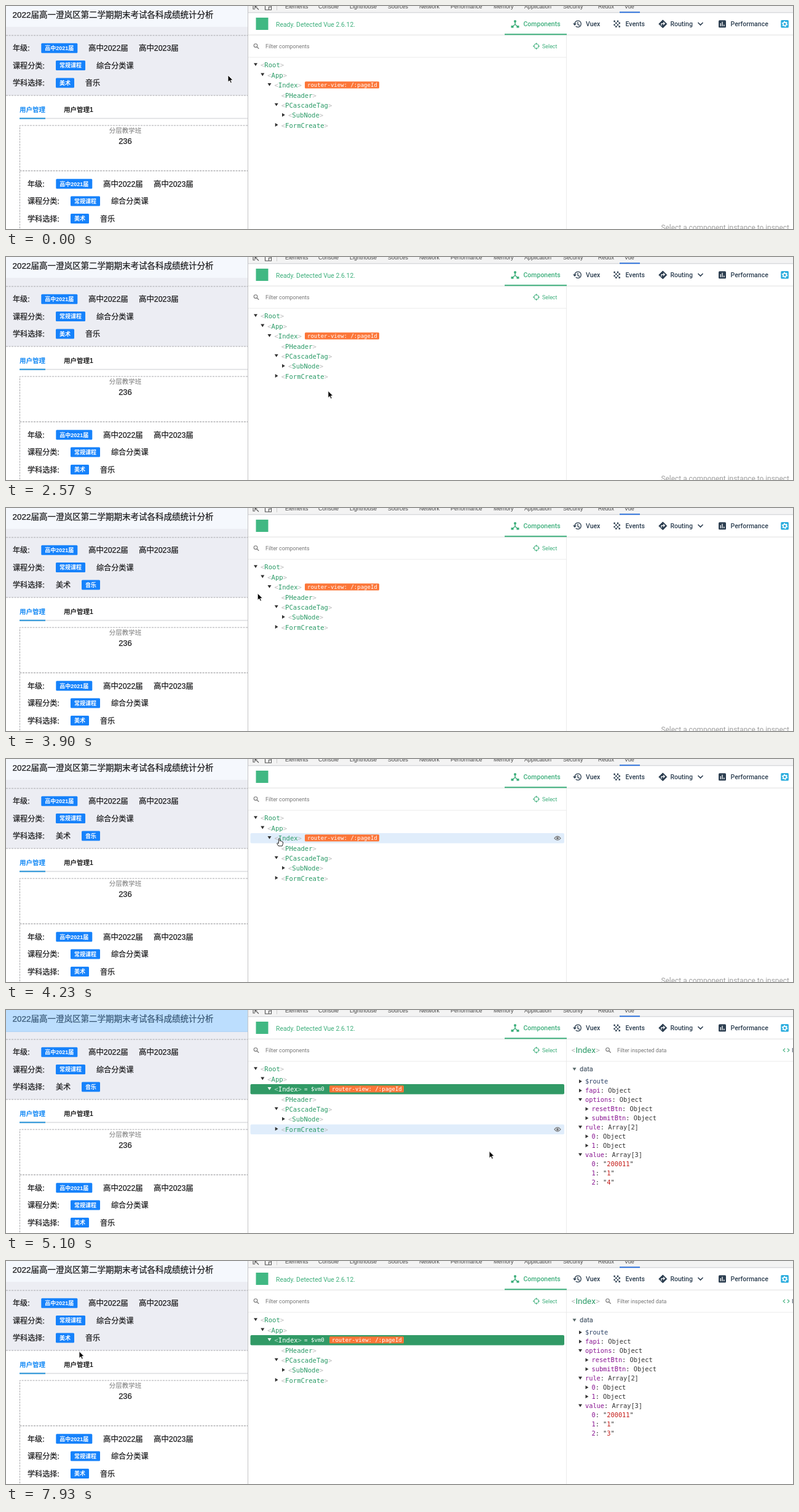
An HTML page that plays this animation: 1280x364 px, repeating every 8000 ms.

```html
<!DOCTYPE html>
<html lang="zh-CN">
<head>
<meta charset="utf-8">
<title>Component inspector</title>
<style>
html, body { margin: 0; width: 100%; height: 100%; overflow: hidden; background: #fff; }
svg {
  display: block; width: 1280px; height: 364px;
  --green: #3eaf7c; --name: #2a9a66; --orange: #fc7638; --blue: #2badde; --logo: #41b883;
  --ink: #2c3e50; --dark: #333; --muted: #777;
}
svg.off {
  --green: #adadad; --name: #a0a0a0; --orange: #b3b3b3; --blue: #c0c0c0; --logo: #adadad;
  --ink: #666; --dark: #707070; --muted: #a8a8a8;
}
.cn { font-family: "Liberation Sans", "Noto Sans CJK SC", "Noto Sans CJK", sans-serif; }
.ui { font-family: Roboto, sans-serif; }
.mono { font-family: "DejaVu Sans Mono", monospace; }
.firm { stroke: #1c1c1e; stroke-width: .25; }
.dash { stroke: #a8a8ac; stroke-dasharray: 3 1.5; fill: none; }
</style>
</head>
<body>
<svg id="stage" viewBox="0 0 1280 364"></svg>
<script>
const BLUE = '#1682fb', INK = 'var(--ink)', DARK = 'var(--dark)', MUTED = 'var(--muted)', LOOP = 8000;
const stage = document.getElementById('stage');

const text = (cls, x, y, size, fill, s, more = '') =>
  `<text class="${cls}" x="${x}" y="${y}" font-size="${size}" fill="${fill}" ${more}>${s}</text>`;
const rect = (x, y, w, h, fill, r = 0) =>
  `<rect x="${x}" y="${y}" width="${w}" height="${h}" rx="${r}" fill="${fill}"/>`;
const path = (d, stroke, width = 1, fill = 'none') =>
  `<path d="${d}" stroke="${stroke}" stroke-width="${width}" fill="${fill}"/>`;
const dot = (x, y, r, fill) => `<circle cx="${x}" cy="${y}" r="${r}" fill="${fill}"/>`;
const ring = (x, y, r, stroke, w = 1) =>
  `<circle cx="${x}" cy="${y}" r="${r}" fill="none" stroke="${stroke}" stroke-width="${w}"/>`;
const group = (id, s) => `<g id="${id}">${s}</g>`;

// Left page
const label = (x, y, s, size = 12.1) => text('cn firm', x, y + 4.4, size, '#1c1c1e', s);
const chip = (x, y, w, s) => rect(x, y - 8, w, 16, BLUE, 1.5) +
  text('cn', x + w / 2, y + 3.3, 9, '#fff', s, 'text-anchor="middle" font-weight="700"');

function filters(dx, dy, choice) {
  return `<g transform="translate(${dx} ${dy})">` +
    label(11, 69, '年级:') + chip(57.3, 68.7, 59, '高中2021届') +
    label(134, 69, '高中2022届', 12.4) + label(216, 69, '高中2023届', 12.4) +
    label(11, 97.3, '课程分类:') + chip(81, 97, 48, '常规课程') + label(147, 97.3, '综合分类课') +
    label(11, 125.6, '学科选择:') + choice + '</g>';
}
const artOn = chip(81, 125.4, 30, '美术') + label(129, 125.6, '音乐');
const musicOn = label(81, 125.6, '美术') + chip(123, 125.4, 30, '音乐');

const page = () =>
  rect(0, 0, 393, 364, '#fff') + rect(0, 0, 393, 146, '#ecedf3') + rect(0, 0, 393, 34, '#f5f8fd') +
  text('cn firm', 10.5, 19, 13.5, '#1c1c1e', '2022届高一澄岚区第二学期期末考试各科成绩统计分析') +
  '<path class="dash" d="M0 48H393M0 146H393"/>' +
  filters(0, 0, group('art', artOn) + group('music', musicOn)) +
  text('cn', 22, 173, 10.5, '#1389f5', '用户管理', 'font-weight="700"') +
  text('cn', 94, 173, 10.5, '#222', '用户管理1', 'font-weight="700"') +
  rect(22, 182.7, 371, 1.6, '#dcdde0') + rect(22, 182.5, 42, 2, '#1e8fd8') +
  '<path class="dash" d="M393 195H22.5V364"/>' +
  '<path class="dash" style="stroke:#8c8c90" d="M22.5 269H393"/>' +
  text('cn', 194, 207.3, 10.5, '#777', '分层教学班', 'text-anchor="middle"') +
  text('cn firm', 194, 224.6, 13, '#1c1c1e', '236', 'text-anchor="middle"') +
  filters(24, 221.5, artOn) +
  group('overlayAll', rect(0, 0, 393, 364, 'rgba(104,182,255,.4)')) +
  group('overlayHead', rect(0, 0, 393, 36, 'rgba(104,182,255,.4)'));

// Developer tools chrome
const panels = {
  Elements: 454, Console: 508, Lighthouse: 559, Sources: 621, Network: 672, Performance: 723,
  Memory: 793, Application: 843, Security: 906, Redux: 963, Vue: 1006
};
const tab = (x, s, fill = INK) => text('ui', x, 33, 10.5, fill, s, 'font-weight="500"');
const lens = (x, y) => ring(x, y, 2.8, MUTED, 1.1) + path(`M${x + 2} ${y + 2}l3.2 3.2`, MUTED, 1.3);

const topBar = () =>
  rect(394, 0, 886, 10.5, '#f3f3f3') + path('M394 10.8H1280', '#c9ccd0') +
  path('M402 0V5H405M405 0L411 6M405 0V4M405 0H409', '#555', 1.1) +
  path('M421.5 0V6.2H431.5V0M427.5 6V1.5H431', '#555', 1.1) + path('M440.5 0V7', '#ccc') +
  Object.entries(panels).map(([s, x]) => text('cn', x, 4, 9, '#444', s)).join('') +
  rect(998, 9.3, 33, 1.9, '#2a6fdb');

const header = () =>
  rect(406.5, 19, 20, 20, 'var(--logo)') +
  group('ready', text('ui', 439, 33.5, 10.4, 'var(--green)', 'Ready. Detected Vue 2.6.12.')) +
  path('M828 25V30L823.5 34M828 30L832.5 34', 'var(--green)', 1.5) +
  dot(828, 25, 2.1, 'var(--green)') + rect(821.5, 32, 4, 3.6, 'var(--green)') +
  rect(830.5, 32, 4, 3.6, 'var(--green)') + tab(841.5, 'Components', 'var(--green)') +
  path('M925 29.5a5.2 5.2 0 1 1 1.7 3.6M930 26V30L933 31.6', INK, 1.3) +
  path('M922 28.5H928L925 32Z', 'none', 0, INK) + tab(943, 'Vuex') +
  [0, 1, 2, 3].map(r => [0, 1].map(c =>
    dot(989.6 + c * 5.4 + (r % 2) * 2.7, 25 + r * 2.9, 1.4, INK)).join('')).join('') +
  tab(1007.5, 'Events') +
  path('M1068.3 22.8L1074.8 29.3L1068.3 35.8L1061.8 29.3Z', INK, 1, INK) +
  path('M1066 32V28.6H1070.5M1069 26.5L1071.2 28.6L1069 30.8', '#fff', 1.2) +
  tab(1080.5, 'Routing') + path('M1125.5 27L1129.5 31L1133.5 27', INK, 1.6) +
  rect(1159, 23.2, 12, 12, INK, 1.5) +
  path('M1162.2 28V33M1165 25.8V33M1167.8 30.5V33', '#fff', 1.3) + tab(1178.5, 'Performance') +
  rect(1260.3, 23, 12.6, 12.6, 'var(--blue)', 1.5) +
  ring(1266.6, 29.3, 2.7, '#fff', 1.6) +
  '<circle cx="1266.6" cy="29.3" r="4" fill="none" stroke="#fff" stroke-width="1.3" stroke-dasharray="2.1 2.09"/>' +
  path('M394 47.3H1280', '#e2e2e2') + rect(811, 45.3, 101, 2, 'var(--green)');

const search = () =>
  lens(406, 64.6) + text('ui', 422, 69, 8.9, MUTED, 'Filter components') +
  ring(862.5, 65.5, 3.9, 'var(--green)') +
  path('M862.5 60V63M862.5 68V71M857 65.5H860M865 65.5H868', 'var(--green)') +
  text('ui', 872, 69, 8.9, 'var(--green)', 'Select') +
  path('M394 83.8H911M911.5 48V364', '#ebebeb');

// Component tree: name, depth, arrow (1 open, 0 closed, -1 none)
const nodes = [['Root', 0, 1], ['App', 1, 1], ['Index', 2, 1], ['PHeader', 3, -1],
  ['PCascadeTag', 3, 1], ['SubNode', 4, 0], ['FormCreate', 3, 0]];
const ROW = 16.4, TOP = 88.3;
const arrow = (x, y, open, fill = DARK) => open < 0 ? '' : path(open
  ? `M${x - 3} ${y - 2.5}H${x + 3}L${x} ${y + 2.3}Z`
  : `M${x - 2} ${y - 3}V${y + 3}L${x + 2.8} ${y}Z`, 'none', 0, fill);
const rowBar = (y, fill) => rect(397.5, y, 510.5, 16.4, fill, 2);
const routeTag = x => rect(x, 123.2, 121, 11.3, 'var(--orange)', 1.5) +
  text('mono', x + 4, 132, 9, '#fff', 'router-view: /:pageId');

function node([name, depth, open], i, chosen) {
  const y = TOP + ROW * (i + .5), x = 414 + depth * 11.25;
  const edge = chosen ? '#a9d9c1' : '#bbb';
  return arrow(x - 8, y - .8, open, chosen ? '#fff' : DARK) +
    text('mono', x, y + 3.8, 10.55, chosen ? '#fff' : 'var(--name)',
      `<tspan fill="${edge}">&lt;</tspan>${name}<tspan fill="${edge}">&gt;</tspan>`);
}
const tree = () =>
  group('hover', rowBar(0, '#e0edfb') +
    path('M892 8.2Q897 1.8 902 8.2Q897 14.6 892 8.2Z', '#777', 1.2) + dot(897, 8.2, 2, '#777')) +
  nodes.map((n, i) => i === 2 ? '' : node(n, i)).join('') +
  group('plain', node(nodes[2], 2) + routeTag(486)) +
  group('chosen', rowBar(121, '#319a66') + node(nodes[2], 2, true) +
    text('mono', 485, 132.4, 9.1, '#fff', '= $vm0') + routeTag(526));

// Data pane: key, value, depth, arrow
const fields = [['$route', '', 0, 0], ['fapi', 'Object', 0, 0], ['options', 'Object', 0, 1],
  ['resetBtn', 'Object', 1, 0], ['submitBtn', 'Object', 1, 0], ['rule', 'Array[2]', 0, 1],
  ['0', 'Object', 1, 0], ['1', 'Object', 1, 0], ['value', 'Array[3]', 0, 1],
  ['0', '"200011"', 1, -1], ['1', '"1"', 1, -1], ['2', '"4"', 1, -1]];

function field([key, value, depth, open], i) {
  const y = 116.6 + i * 14.95, x = 942 + depth * 10.5;
  const quoted = value[0] === '"';
  const shown = quoted
    ? `"<tspan fill="#c41a16" ${i === 11 ? 'id="last"' : ''}>${value.slice(1, -1)}</tspan>"` : value;
  return arrow(x - 8, y, open) + text('mono', x, y + 3.7, 10.3, '#333',
    `<tspan fill="${value ? '#881391' : '#2f4568'}">${key}</tspan>` + (value && ': ' + shown));
}
const dataPane = () =>
  text('ui', 919.5, 70, 13.5, 'var(--name)',
    '<tspan fill="#bbb">&lt;</tspan>Index<tspan fill="#bbb">&gt;</tspan>') +
  lens(978.5, 64.6) + text('ui', 994, 69, 8.9, MUTED, 'Filter inspected data') +
  path('M1267 62.8L1264.2 65.6L1267 68.4M1271 62.8L1273.8 65.6L1271 68.4', 'var(--green)', 1.2) +
  text('ui', 1278, 69, 8.9, INK, 'Inspect DOM') + path('M912 83.8H1280', '#ebebeb') +
  arrow(924.5, 96.8, 1, '#566') + text('ui', 933, 100.4, 11, INK, 'data') +
  fields.map(field).join('');

const pointer =
  group('arrow', path('M0 0V11.2L2.6 8.8L4.4 12.8L6.3 12L4.6 8.1H8.1Z', '#fff', .9, '#000')) +
  group('hand', path('M-1 0Q0-1.5 1 0V4Q2 3.2 3 4.4Q4 3.8 4.7 5Q6 4.6 6 6V8.5L4.8 12H-1.2L-3.8 7.8Q-3.5 6.3-1 7.8Z',
    '#222', 1, '#fff'));

stage.innerHTML = rect(394, 0, 886, 364, '#fff') + page() + path('M393.5 0V364', '#c4c4c6') +
  topBar() + header() + search() + tree() +
  group('empty', text('ui', 1065.5, 366, 11.9, '#a0a0a0', 'Select a component instance to inspect')) +
  group('data', dataPane()) + group('pointer', pointer);

const el = {};
stage.querySelectorAll('[id]').forEach(n => el[n.id] = n);
const show = (id, on) => el[id].setAttribute('display', on ? 'inline' : 'none');

// Pointer stops: time, x, y
const stops = [[0, 361, 113], [1300, 361, 113], [1470, 449, 132], [1760, 560, 236], [2400, 560, 236],
  [3000, 377, 148], [3750, 377, 148], [4060, 444, 130], [4700, 446, 130], [5100, 786, 230.5],
  [5300, 786, 230.5], [6100, 817, 264.5], [6500, 817, 264.5], [7250, 96, 127], [7400, 96, 127],
  [7650, 119, 147.5], [LOOP, 119, 147.5]];

function pointerAt(t) {
  const i = Math.max(1, stops.findIndex(s => s[0] > t));
  const [t0, x0, y0] = stops[i - 1], [t1, x1, y1] = stops[i];
  const u = (t - t0) / (t1 - t0), k = u * u * (3 - 2 * u);
  return [x0 + (x1 - x0) * k, y0 + (y1 - y0) * k];
}
function rowAt([x, y]) {
  const i = Math.floor((y - TOP) / ROW);
  return x > 398 && x < 908 && nodes[i] ? i : -1;
}

function draw(t) {
  const within = (a, b) => t >= a && t < b;
  const at = pointerAt(t), picked = t >= 4480;
  // The row highlight trails the pointer slightly.
  const row = t > 4000 ? rowAt(pointerAt(t - 150)) : -1;
  const music = within(3900, 7320);

  stage.classList.toggle('off', within(3640, 3900));
  show('ready', !within(3900, 4400));
  show('art', !music);
  show('music', music);
  show('overlayAll', within(4320, 4860));
  show('overlayHead', within(4860, 5240));
  show('hover', row >= 0);
  el.hover.setAttribute('transform', `translate(0 ${TOP + ROW * row})`);
  show('plain', !picked);
  show('chosen', picked);
  show('empty', !picked);
  show('data', picked);
  el.last.textContent = t < 7830 ? '4' : '3';

  const hand = row >= 0 && rowAt(at) >= 0;
  show('hand', hand);
  show('arrow', !hand);
  el.pointer.setAttribute('transform', `translate(${at[0].toFixed(1)} ${at[1].toFixed(1)})`);
}

const start = performance.now();
function tick() {
  draw((performance.now() - start) % LOOP);
  requestAnimationFrame(tick);
}
tick();
</script>
</body>
</html>
```
